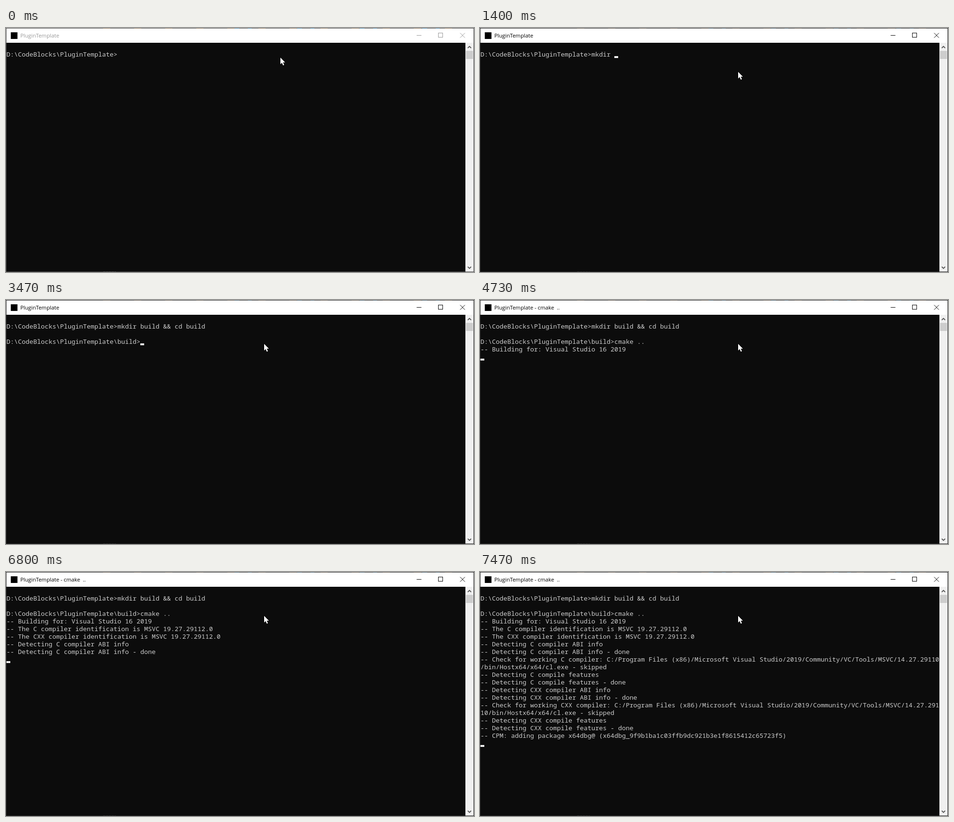
These frames come from a looping animation (979 px wide and 512 px high, 8000 ms). An HTML page:

```html
<!DOCTYPE html>
<html lang="en">
<head>
<meta charset="utf-8">
<title>PluginTemplate</title>
<style>
  html, body { margin: 0; width: 100%; height: 100%; overflow: hidden; background: #0c0c0c; }
  #win { --ink: #000; --edge: #262626; --bits: .3; position: relative; width: 979px; height: 512px; overflow: hidden; }
  #win.idle { --ink: #999; --edge: #4a4a4a; --bits: .75; }
  #win > * { position: absolute; }
  svg { left: 0; top: 0; }
  #title {
    left: 30px; top: 8px; line-height: 16px; white-space: pre; color: var(--ink);
    font-family: "Open Sans", "Noto Sans", sans-serif; font-size: 11.3px;
  }
  #screen {
    left: 1px; top: 31px; margin: 0; color: #ccc; line-height: 16px;
    font-family: "Noto Sans Mono", "DejaVu Sans Mono", monospace; font-size: calc(40px / 3);
    font-variant-ligatures: none;
  }
  #caret { left: 0; top: 0; width: 8px; height: 4px; background: #f2f2f2; }
  .ink { stroke: var(--ink); fill: none; }
  .edge { stroke: var(--edge); fill: none; }
  .bits { opacity: var(--bits); }
</style>
</head>
<body>
<div id="win" class="idle">
  <svg width="979" height="512">
    <rect width="979" height="512" fill="#0c0c0c"/>
    <rect x="1" y="1" width="977" height="30" fill="#fff"/>
    <rect x="961" y="31" width="17" height="480" fill="#f0f0f0"/>
    <rect x="962" y="48" width="15" height="17" fill="#cdcdcd"/>
    <path d="M966 42l3.5-3.5 3.5 3.5M966 501l3.5 3.5 3.5-3.5" fill="none" stroke="#555" stroke-width="1.8"/>
    <rect class="edge" x=".5" y=".5" width="978" height="511"/>
    <g class="bits" fill="none">
      <path d="M203 .5H960" stroke="#8a6a45" stroke-dasharray="15 50"/>
      <path d="M478 .5H960" stroke="#2c7fb0" stroke-dasharray="10 18 8 95"/>
      <path d="M203 511.5h27" stroke="#777" stroke-dasharray="5 1"/>
    </g>
    <rect x="10" y="9" width="14" height="14"/>
    <g class="ink">
      <path d="M859 15.5h10"/>
      <rect x="904.5" y="10.5" width="9" height="9"/>
      <path d="M950 10.5l10 10M960 10.5l-10 10"/>
    </g>
  </svg>
  <div id="title"></div>
  <pre id="screen"></pre>
  <div id="caret"></div>
  <svg id="pointer" width="14" height="20" style="overflow: visible">
    <path d="M0 0V14L3.2 11 5.6 16.6 7.9 15.6 5.6 10.2H10Z" fill="#fff" stroke="#000" stroke-width="1.4" paint-order="stroke"/>
  </svg>
</div>
<script>
  const LOOP = 8000, COLS = 120, CELL_W = 8, CELL_H = 16;
  const FOCUS = 400, CARET_ON = 930, RUN = 4600;
  const $ = id => document.getElementById(id);
  const win = $('win'), title = $('title'), screen_ = $('screen'), caret = $('caret'), pointer = $('pointer');

  const home = 'D:\\CodeBlocks\\PluginTemplate';
  const tools = 'C:/Program Files (x86)/Microsoft Visual Studio/2019/Community/VC/Tools/MSVC/14.27.29110/bin/Hostx64/x64/cl.exe';
  const log = (...lines) => lines.map(s => `-- ${s}\n`).join('');
  const check = lang => `Check for working ${lang} compiler: ${tools} - skipped`;
  const features = lang => [`Detecting ${lang} compile features`, `Detecting ${lang} compile features - done`];

  // [time, text added to the console]
  const output = [
    [0, `\n${home}>`],
    [1070, 'm'], [1130, 'k'], [1270, 'd'], [1330, 'ir'], [1400, ' '], [1530, 'b'],
    [1670, 'u'], [1730, 'i'], [1800, 'l'], [2000, 'd'], [2130, ' '],
    [2400, '&'], [2470, '&'], [2530, ' '],
    [2730, 'c'], [2800, 'd'], [2930, ' '], [3000, 'b'], [3070, 'u'], [3130, 'i'], [3200, 'l'], [3330, 'd'],
    [3470, `\n\n${home}\\build>`],
    ...[...'cmake ..'].map((c, i) => [4000 + Math.round(i * 6.67) * 10, c]),
    [RUN, '\n'],
    [4730, log('Building for: Visual Studio 16 2019')],
    [5670, log('The C compiler identification is MSVC 19.27.29112.0')],
    [6200, log('The CXX compiler identification is MSVC 19.27.29112.0', 'Detecting C compiler ABI info')],
    [6800, log('Detecting C compiler ABI info - done')],
    [6870, log(check('C'), ...features('C'), 'Detecting CXX compiler ABI info')],
    [7400, log('Detecting CXX compiler ABI info - done', check('CXX'), ...features('CXX'))],
    [7470, log('CPM: adding package x64dbg@ (x64dbg_9f9b1ba1c03ffb9dc921b3e1f8615412c65723f5)')]
  ];

  // [time, x, y] of the pointer tip
  const moves = [[0, 574, 62], [70, 564, 71], [130, 549, 84], [200, 540, 92]];

  const wrap = text => text.replace(new RegExp(`(.{${COLS}})(?=.)`, 'g'), '$1\n');
  const place = (el, x, y) => { el.style.transform = `translate(${x}px, ${y}px)`; };
  let shown = null;

  function draw(t) {
    const text = wrap(output.filter(([at]) => at <= t).map(([, s]) => s).join(''));
    if (text !== shown) {
      screen_.textContent = shown = text;
      const lines = text.split('\n');
      place(caret, 1 + lines.at(-1).length * CELL_W, 31 + lines.length * CELL_H - 4);
    }
    const [, x, y] = moves.filter(([at]) => at <= t).at(-1);
    place(pointer, x, y);
    win.classList.toggle('idle', t < FOCUS);
    caret.hidden = t < CARET_ON;
    title.textContent = 'PluginTemplate' + (t < RUN ? '' : ' - cmake  ..');
  }

  function tick() {
    draw(performance.now() % LOOP);
    requestAnimationFrame(tick);
  }
  tick();
</script>
</body>
</html>
```
